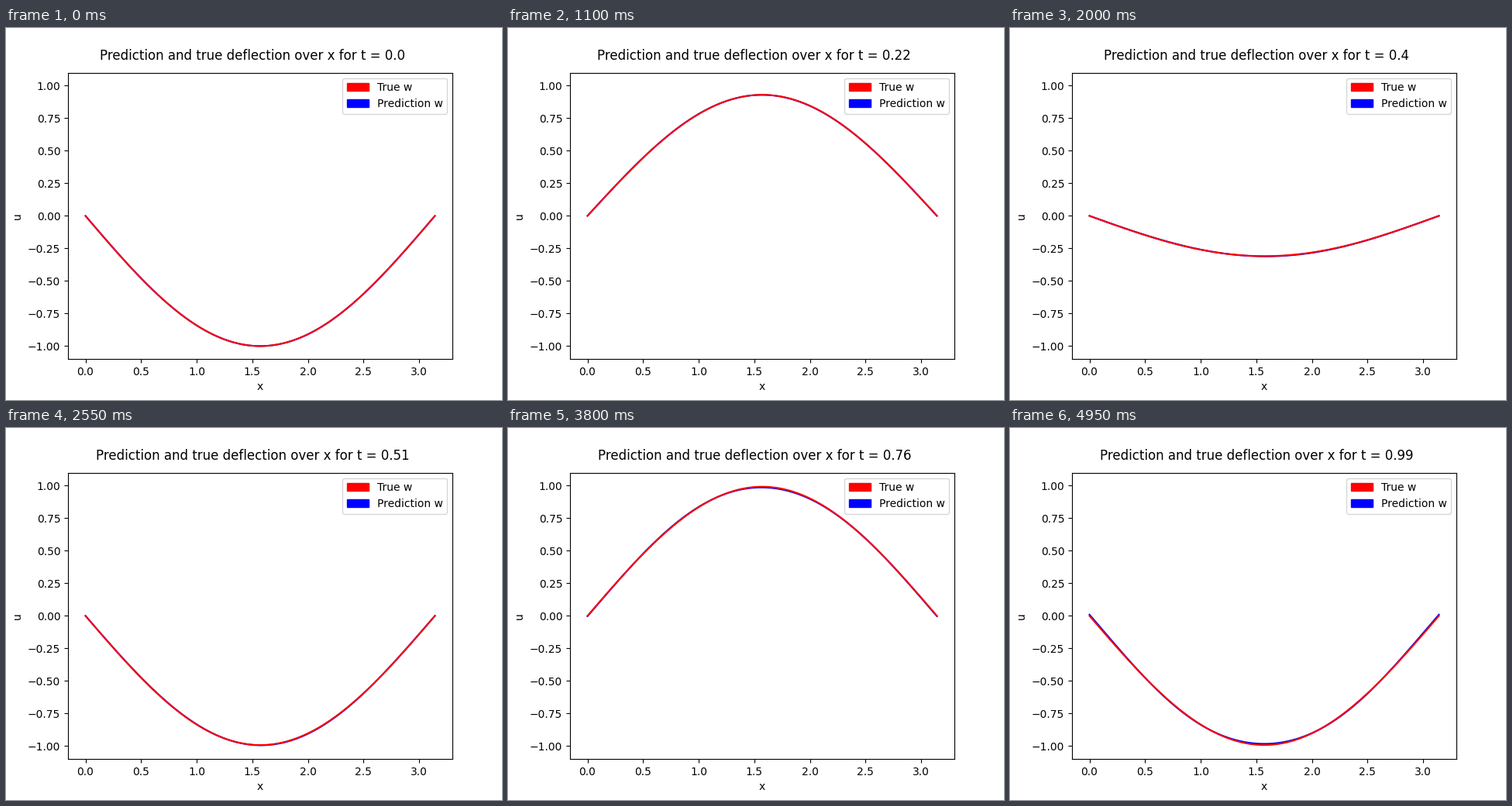
These frames come from a looping animation (640x480 px, 5000 ms). A matplotlib script:

```python
import numpy as np
import matplotlib.pyplot as plt
from matplotlib.animation import FuncAnimation
from matplotlib.patches import Patch

FRAMES = 100
INTERVAL = 50

x = np.linspace(0, np.pi, 100)


def true_w(t):
    return -np.cos(4 * np.pi * t) * np.sin(x)


def predicted_w(t):
    """True deflection plus a small smooth error that grows with time."""
    late = t**4 * np.cos(4 * np.pi * t) * (0.003 + 0.007 * np.cos(4 * x))
    middle = 0.008 * t * np.sin(np.pi * t) * np.cos(2 * x - 0.9) * np.sin(x)
    return true_w(t) + late + middle


fig, ax = plt.subplots(figsize=(6.4, 4.8), dpi=100)
margin = 0.05 * np.pi
ax.set_xlim(-margin, np.pi + margin)
ax.set_ylim(-1.1, 1.1)
ax.set_xlabel("x")
ax.set_ylabel("u")
ax.legend(
    handles=[Patch(color="red", label="True w"),
             Patch(color="blue", label="Prediction w")],
    loc="upper right",
)

pred_line, = ax.plot([], [], color="blue", lw=1.5)
true_line, = ax.plot([], [], color="red", lw=1.5)
title = ax.text(1.5, 1.2, "", fontsize=12, ha="center")


def update(i):
    t = i / FRAMES
    pred_line.set_data(x, predicted_w(t))
    true_line.set_data(x, true_w(t))
    title.set_text(f"Prediction and true deflection over x for t = {t}")
    return pred_line, true_line, title


anim = FuncAnimation(fig, update, frames=FRAMES, interval=INTERVAL,
                     repeat=True, repeat_delay=0)
plt.show()
```
